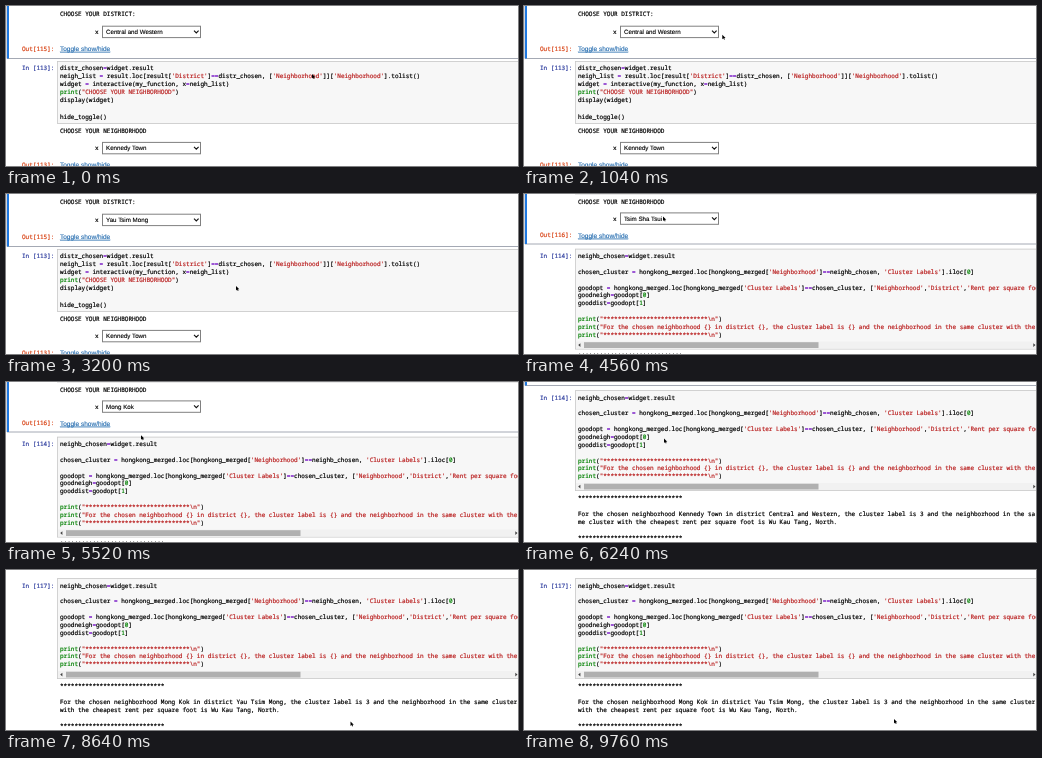
An HTML page for the animation above (9840 ms loop, 512 by 160 pixels).

```html
<!DOCTYPE html>
<html lang="en">
<head>
<meta charset="utf-8">
<title>Notebook neighborhood picker</title>
<style>
  html, body { margin: 0; width: 100%; height: 100%; overflow: hidden; background: #fff; }
  svg { display: block; width: 512px; height: 160px; }
  text { white-space: pre; text-rendering: geometricPrecision; }
  .mono { font: 6px "Noto Sans Mono", monospace; fill: #000; stroke: #000; stroke-width: .2px; }
  .sans { font: 6.2px "Liberation Sans", sans-serif; fill: #000; stroke: #000; stroke-width: .12px; }
  .link { font-size: 6.5px; fill: #1f68ad; stroke: #1f68ad; text-decoration: underline; }
  .in { fill: #303f9f; stroke: #303f9f; }
  .out { fill: #d84315; stroke: #d84315; }
  .str { fill: #ba2121; stroke: #ba2121; }
  .fn, .num { fill: #008000; stroke: #008000; }
  .op { fill: #7d20c8; stroke: #7d20c8; }
  .hot { fill: #fff; stroke: #fff; }
</style>
</head>
<body>
<svg id="stage" viewBox="0 0 512 160"></svg>
<script>
const LOOP = 9840, STEP = 80, ROW = 7.75;
const SCROLL_A = 117.5, SCROLL_B = 164;
const OPEN_1 = 1440, PICK_1 = 2560, RUN_1 = 3360;
const OPEN_2 = 4720, PICK_2 = 5120, SCROLL_2 = 5520, RUN_2 = 6640;
const GRAY = '#808080', BLUE = '#3d8fdb';

const districts = ['Central and Western', 'Wan Chai', 'Eastern', 'Southern', 'Yau Tsim Mong',
  'Sham Shui Po', 'Kowloon City', 'Wong Tai Sin', 'Kwun Tong', 'Kwai Tsing', 'Tsuen Wan',
  'Tuen Mun', 'Yuen Long', 'North', 'Tai Po', 'Sha Tin', 'Sai Kung', 'Islands'];
const areas = ['Tsim Sha Tsui', 'Yau Ma Tei', 'Mong Kok', 'Tai Kok Tsui'];
const stars = '*'.repeat(29);

const pickCode = [
  'distr_chosen=widget.result',
  "neigh_list = result.loc[result['District']==distr_chosen, ['Neighborhood']]['Neighborhood'].tolist()",
  'widget = interactive(my_function, x=neigh_list)',
  'print("CHOOSE YOUR NEIGHBORHOOD")',
  'display(widget)',
  '',
  'hide_toggle()'
];
const answerCode = [
  'neighb_chosen=widget.result',
  '',
  "chosen_cluster = hongkong_merged.loc[hongkong_merged['Neighborhood']==neighb_chosen, 'Cluster Labels'].iloc[0]",
  '',
  "goodopt = hongkong_merged.loc[hongkong_merged['Cluster Labels']==chosen_cluster, ['Neighborhood','District','Rent per square foot']]",
  'goodneigh=goodopt[0]',
  'gooddist=goodopt[1]',
  '',
  `print("${stars}\\n")`,
  'print("For the chosen neighborhood {} in district {}, the cluster label is {} and the neighborhood in the same cluster with the cheapest rent")',
  `print("${stars}\\n")`
];
const answers = [
  ['For the chosen neighborhood Kennedy Town in district Central and Western, the cluster label is 3 and the neighborhood in the sa',
   'me cluster with the cheapest rent per square foot is Wu Kau Tang, North.'],
  ['For the chosen neighborhood Mong Kok in district Yau Tsim Mong, the cluster label is 3 and the neighborhood in the same cluster',
   'with the cheapest rent per square foot is Wu Kau Tang, North.']
];

// Pointer tip: time, x, y
const path = [
  [0, 306, 68], [320, 306, 68], [1200, 188, 25], [1440, 188, 25], [2000, 177.5, 61],
  [2360, 165, 66], [2640, 165, 66], [3120, 230, 92], [3440, 230, 92], [4400, 139, 22.5],
  [4720, 139, 22.5], [5000, 130, 50], [5200, 130, 50], [5840, 140, 56.5], [6560, 140, 56.5],
  [7120, 223, 117.5], [7280, 223, 117.5], [8320, 344.5, 151.5], [8720, 344.5, 151.5],
  [9360, 370, 149], [9840, 370, 149]
];

const NS = 'http://www.w3.org/2000/svg';
const stage = document.getElementById('stage');

function add(parent, tag, attrs = {}, content = '') {
  const el = document.createElementNS(NS, tag);
  for (const key in attrs) el.setAttribute(key, attrs[key]);
  el.textContent = content;
  parent.appendChild(el);
  return el;
}
const label = (parent, x, mid, cls, s) => add(parent, 'text', { x, y: mid + 2.1, class: cls }, s);
const rect = (parent, x, y, width, height, fill, more = {}) =>
  add(parent, 'rect', { x, y, width, height, fill, ...more });
const show = (el, on) => el.setAttribute('display', on ? 'inline' : 'none');
const put = (el, s) => { if (el.textContent !== s) el.textContent = s; };
const ease = p => { p = Math.min(1, Math.max(0, p)); return p * p * (3 - 2 * p); };

function code(parent, lines, mid, pitch) {
  const token = /(["'])(?:(?!\1).)*\1|\bprint\b|\b\d+\b|=+|[^"'=\d]+?(?=["'=\d]|\bprint\b|$)|./g;
  lines.forEach((line, i) => {
    const row = label(parent, 54, mid + i * pitch, 'mono', '');
    for (const [part] of line.matchAll(token)) {
      const cls = /^["']/.test(part) ? 'str' : part === 'print' ? 'fn'
        : /^\d+$/.test(part) ? 'num' : part[0] === '=' ? 'op' : '';
      add(row, 'tspan', { class: cls }, part);
    }
  });
}

function inputBox(y, height) {
  rect(doc, 51.5, y, 480, height, '#f7f7f7', { stroke: '#c8c8c8', 'stroke-width': .8 });
}

function picker(mid) {
  label(doc, 89, mid, 'mono', 'x');
  const box = rect(doc, 96.5, mid - 5.6, 98, 11.4, '#fff', { stroke: GRAY });
  add(doc, 'path', { d: `M188 ${mid - 1.2}l2.3 2.4l2.3-2.4`, fill: 'none', stroke: '#111', 'stroke-width': 1.1 });
  const value = label(doc, 100, mid, 'sans', '');
  return (s, open) => {
    put(value, s);
    box.setAttribute('stroke', open ? BLUE : GRAY);
  };
}

function menu(top, items) {
  const g = add(doc, 'g');
  rect(g, 96.5, top, 98, items.length * ROW + .6, '#fff', { stroke: BLUE });
  const bar = rect(g, 97, top, 97, ROW, '#0a78ff');
  const rows = items.map((s, i) => label(g, 100, top + ROW * (i + .5) + .1, 'sans', s));
  return (open, pointerY) => {
    show(g, open);
    const at = Math.min(items.length - 1, Math.max(0, Math.floor((pointerY - top) / ROW)));
    bar.setAttribute('y', top + at * ROW);
    rows.forEach((r, i) => r.setAttribute('class', i === at ? 'sans hot' : 'sans'));
  };
}

function selection(top, bottom) {
  const g = add(doc, 'g');
  add(g, 'path', { d: `M1 ${top}H530V${bottom}H1Z`, fill: 'none', stroke: '#a4a9b4' });
  rect(g, 1, top, 2, bottom - top, '#1e78e0');
  return g;
}

rect(stage, 0, 0, 512, 160, '#fff');
const doc = add(stage, 'g');

// District cell
const frame1 = selection(-70, 52.5);
label(doc, 54, 8.2, 'mono', 'CHOOSE YOUR DISTRICT:');
const district = picker(25.8);
label(doc, 16, 42.5, 'mono out', 'Out[115]:');
label(doc, 54, 42.7, 'sans link', 'Toggle show/hide');

// Neighborhood cell
const frame2 = selection(53, 167.5);
inputBox(55.5, 62);
const in2 = label(doc, 16, 62, 'mono in', '');
code(doc, pickCode, 62, 8.08);
label(doc, 54, 125, 'mono', 'CHOOSE YOUR NEIGHBORHOOD');
const area = picker(142);
const out2 = label(doc, 16, 158.8, 'mono out', '');
label(doc, 54, 159, 'sans link', 'Toggle show/hide');

// Answer cell
inputBox(172.6, 100);
const in3 = label(doc, 16, 179.5, 'mono in', '');
code(doc, answerCode, 179.5, 7.87);
rect(doc, 52, 265, 470, 7, '#f1f1f1');
rect(doc, 60, 265.7, 234.5, 5.8, '#b0b0b0');
add(doc, 'path', { d: 'M56.4 266.8v3.6l-2.2-1.8zM509.3 266.8v3.6l2.2-1.8z', fill: '#444' });
label(doc, 54, 279.4, 'mono', stars);
const answer = [295.8, 303.8].map(y => label(doc, 54, y, 'mono', ''));
label(doc, 54, 320, 'mono', stars);

const menu1 = menu(32.1, districts);
const menu2 = menu(148.2, areas);
const pointer = add(stage, 'path', { d: 'M0 0V4.4L1.1 3.5L1.8 5L2.6 4.6L1.9 3.2H3.3Z', fill: '#000' });

function pointerAt(t) {
  const i = Math.max(1, path.findIndex(k => k[0] >= t));
  const [t0, x0, y0] = path[i - 1], [t1, x1, y1] = path[i];
  const p = ease((t - t0) / (t1 - t0));
  return [x0 + (x1 - x0) * p, y0 + (y1 - y0) * p];
}

function draw(t) {
  const scroll = SCROLL_A * ease((t - 3600) / 560) + (SCROLL_B - SCROLL_A) * ease((t - SCROLL_2) / 480);
  const [x, y] = pointerAt(t);
  const ran1 = t >= RUN_1, ran2 = t >= RUN_2;
  const open1 = t >= OPEN_1 && t < PICK_1, open2 = t >= OPEN_2 && t < PICK_2;

  doc.setAttribute('transform', `translate(0 ${-scroll})`);
  pointer.setAttribute('transform', `translate(${x} ${y})`);
  show(frame1, !ran1);
  show(frame2, ran1 && !ran2);
  district(districts[t < PICK_1 ? 0 : 4], open1);
  area(!ran1 ? 'Kennedy Town' : areas[t < PICK_2 ? 0 : 2], open2);
  put(in2, ran1 ? 'In [116]:' : 'In [113]:');
  put(out2, ran1 ? 'Out[116]:' : 'Out[113]:');
  put(in3, ran2 ? 'In [117]:' : 'In [114]:');
  answer.forEach((el, i) => put(el, answers[ran2 ? 1 : 0][i]));
  menu1(open1, y + scroll);
  menu2(open2, y + scroll);
}

const start = performance.now();
function tick() {
  const t = (performance.now() - start) % LOOP;
  draw(Math.floor(t / STEP) * STEP);
  requestAnimationFrame(tick);
}
draw(0);
requestAnimationFrame(tick);
</script>
</body>
</html>
```
